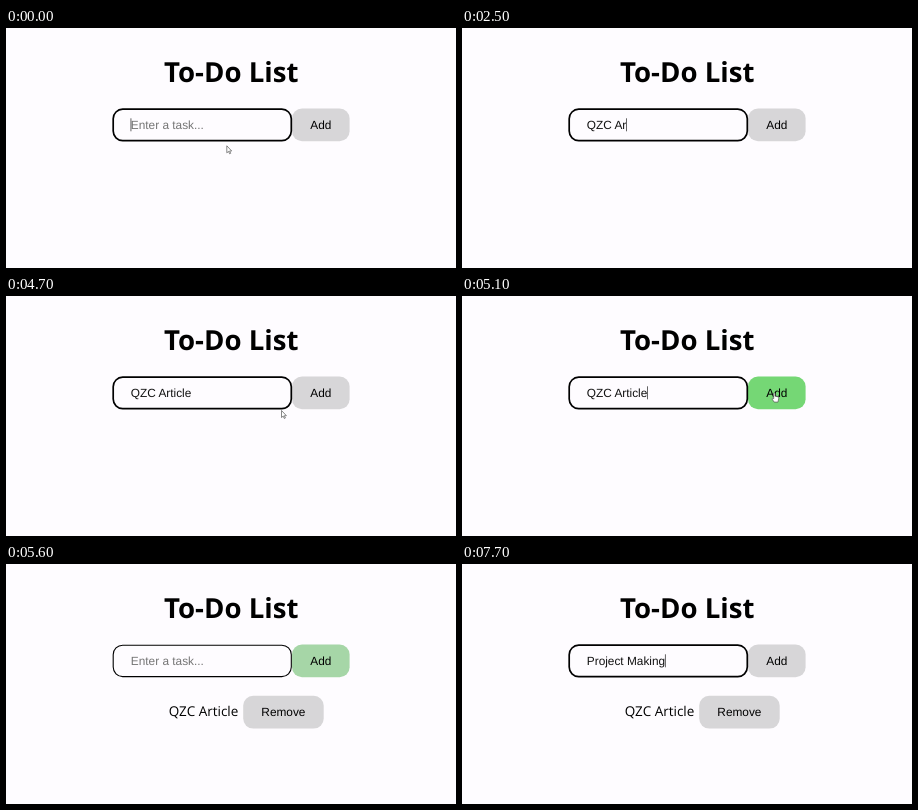
An HTML page that plays this animation: 450x240 px, repeating every 8000 ms.

```html
<!DOCTYPE html>
<html lang="en">
<head>
<meta charset="utf-8">
<title>To-Do List</title>
<style>
  html, body { margin: 0; height: 100%; overflow: hidden; background: #fefcff; }
  svg { display: block; }
  text { font: 11.85px "Liberation Sans", Arial, sans-serif; text-rendering: geometricPrecision; white-space: pre; }
  .ui { font-family: "Open Sans", "Noto Sans", sans-serif; }
  #title { font-size: 27.6px; font-weight: 700; }
  #item .ui { font-size: 13.5px; }
  .mid { text-anchor: middle; }
  .button { fill: #d7d6d8; }
  #pointer path { fill: #fff; stroke: #555; stroke-width: .7; stroke-linejoin: round; }
</style>
</head>
<body>
<svg width="450" height="240" viewBox="0 0 450 240">
  <text id="title" class="ui mid" x="225.2" y="54.2">To-Do List</text>
  <rect id="add" class="button" x="286" y="80.5" width="57.6" height="32.8" rx="10"/>
  <text class="mid" x="314.8" y="100.6">Add</text>
  <rect id="box" x="107.2" y="81.2" width="178.1" height="31.4" rx="9.5" fill="#fefcff" stroke="#000"/>
  <text id="field" x="124.8" y="100.6"></text>
  <rect id="caret" y="90.3" width=".7" height="13" fill="#222"/>
  <g id="item">
    <text class="ui" x="162.7" y="151.8">QZC Article</text>
    <rect class="button" x="237.2" y="131.8" width="80.5" height="32.8" rx="10"/>
    <text class="mid" x="277.4" y="152">Remove</text>
  </g>
  <g id="pointer">
    <path id="arrow" d="M0 0V7L1.7 5.6L2.8 8L3.9 7.5L2.8 5.2H4.9Z"/>
    <path id="hand" d="M1.7 5.5V.6Q2.4-.4 3.1.6V3.4L6 4Q6.9 4.4 6.7 5.6L6 9.3H2.2L0 6.2Q0 5 1.7 5.9Z"/>
  </g>
</svg>
<script>
const $ = id => document.getElementById(id);
const LOOP = 8000;

// Each track lists [start time, value]; a value holds until the next one.
const typed = [
  [0, ""], [800, "Q"], [1000, "QZ"], [1200, "QZC"], [1600, "QZC\u00a0"],
  [2100, "QZC A"], [2400, "QZC Ar"], [3300, "QZC Art"], [3500, "QZC Arti"],
  [3700, "QZC Artic"], [3800, "QZC Articl"], [3900, "QZC Article"],
  [5300, ""], [7700, "Project Making"]
];
const caretOn = [
  [0, 1], [500, 0], [800, 1], [2900, 0], [3300, 1], [4500, 0],
  [5100, 1], [5200, 0], [6100, 1], [6500, 0], [7100, 1], [7600, 0], [7700, 1]
];
const focused = [[0, 1], [5200, 0], [6100, 1]];
const pointer = [
  [0, ["arrow", 220.8, 117.8]], [1400, null],
  [4600, ["arrow", 275.5, 114.5]], [4900, ["hand", 310, 96.8]],
  [5400, ["hand", 271.8, 108.3]], [5500, null]
];

const at = (track, t) => track.findLast(step => step[0] <= t)[1];
const show = (id, on) => $(id).style.display = on ? "" : "none";
const mix = (a, b, k) => a.map((v, i) => v + (b[i] - v) * k);

function draw(t) {
  const text = at(typed, t);
  $("field").textContent = text || "Enter a task...";
  $("field").setAttribute("fill", text ? "#111" : "#757575");
  $("caret").setAttribute("x", 124.6 + (text ? $("field").getComputedTextLength() : 0));
  show("caret", at(caretOn, t));
  $("box").setAttribute("stroke-width", at(focused, t) ? 1.7 : 1.1);

  const hover = t < 5100 ? 0 : Math.min(1, Math.max(0, (5700 - t) / 200));
  $("add").style.fill = `rgb(${mix([215, 214, 216], [117, 215, 117], hover)})`;
  show("item", t >= 5300);

  const p = at(pointer, t);
  show("pointer", p);
  if (p) {
    show("arrow", p[0] === "arrow");
    show("hand", p[0] === "hand");
    $("pointer").setAttribute("transform", `translate(${p[1]} ${p[2]})`);
  }
}

const start = performance.now();
function tick() {
  draw((performance.now() - start) % LOOP);
  requestAnimationFrame(tick);
}
tick();
</script>
</body>
</html>
```
